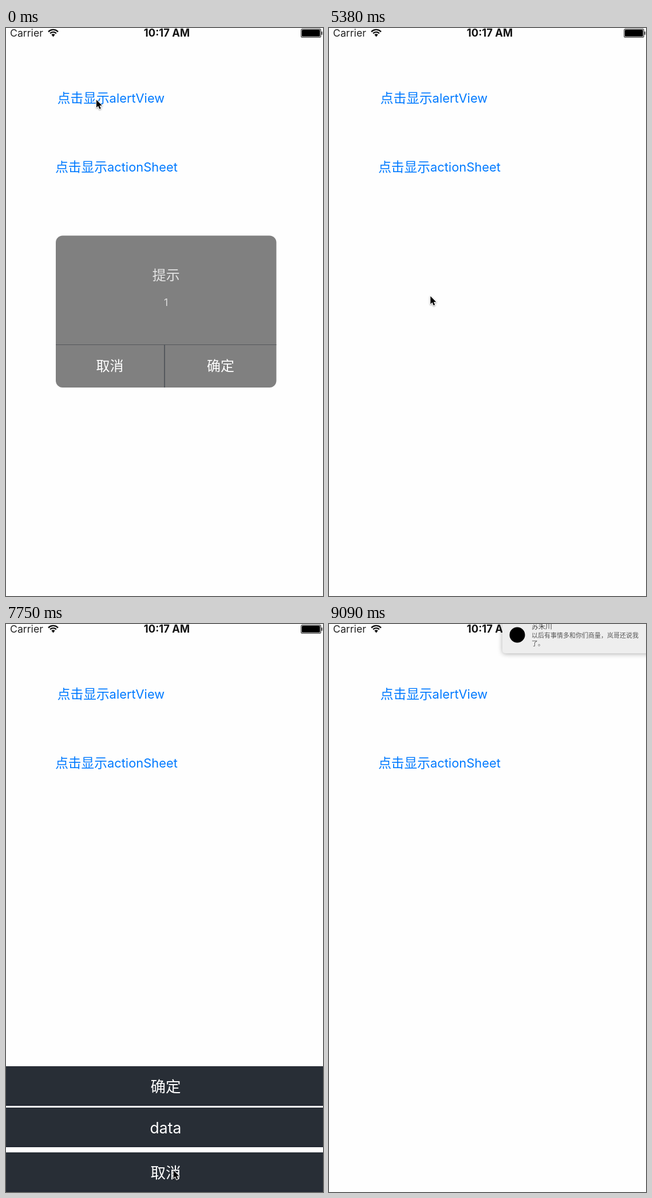
Write an HTML page with a canvas that moves like this. It is 554 px wide and 989 px high and loops after 9.64 s.

```html
<!DOCTYPE html>
<html lang="zh-CN">
<head>
<meta charset="utf-8">
<style>
  html, body { margin: 0; width: 100%; height: 100%; overflow: hidden; background: #fefefe; }
  canvas { display: block; }
</style>
</head>
<body>
<canvas id="stage" width="554" height="989"></canvas>
<script>
const LOOP = 9640, WIDTH = 554, HEIGHT = 989;
const STEP = 148.3;
const DISMISS = 4930;    // the alert starts closing; the refresh clock restarts here
const FONT = 'Inter, "Noto Sans CJK SC", "Noto Sans CJK", sans-serif';
const BLUE = '#007aff';
const ctx = document.getElementById('stage').getContext('2d');

const MOVES = [
  { start: 0, time: 740, x: 202, y: 602 },
  { start: 1330, time: 440, x: 192, y: 594 },
  { start: 5080, time: 720, x: 152, y: 247 },
  { start: 6493, time: 380, x: 276, y: 782 },
  { start: 7010, time: 880, x: 294, y: 964 }
];

const clamp = v => Math.min(1, Math.max(0, v));
const mix = (a, b, u) => a + (b - a) * u;

function ease(t, start, time = 450) {
  const u = clamp((t - start) / time);
  return u * u * (3 - 2 * u);
}

function refreshTime(now) {
  const start = now < DISMISS ? 0 : DISMISS;
  return start + Math.floor((now - start + 5) / STEP) * STEP;
}

function rect(x, y, w, h, color, radius = 0) {
  ctx.fillStyle = color;
  ctx.beginPath();
  ctx.roundRect(x, y, w, h, radius);
  ctx.fill();
}

function text(str, x, y, size, color, align = 'center', weight = 400) {
  ctx.font = `${weight} ${size}px ${FONT}`;
  ctx.textAlign = align;
  ctx.fillStyle = color;
  ctx.fillText(str, x, y);
}

function drawStatusBar() {
  text('Carrier', 7, 15, 17.7, '#222', 'left');
  text('10:17 AM', 281, 15, 18.4, '#111', 'center', 700);

  ctx.strokeStyle = ctx.fillStyle = '#111';
  ctx.lineWidth = 2.4;
  const left = -Math.PI * 0.76, right = -Math.PI * 0.24;
  for (const r of [7.4, 11.6]) {
    ctx.beginPath();
    ctx.arc(82.5, 14.5, r, left, right);
    ctx.stroke();
  }
  ctx.beginPath();
  ctx.moveTo(82.5, 15.5);
  ctx.arc(82.5, 14.5, 4.3, left, right);
  ctx.fill();

  ctx.strokeStyle = '#555';
  ctx.lineWidth = 1.4;
  ctx.beginPath();
  ctx.roundRect(515.7, 1.7, 34.5, 14.5, 2.5);
  ctx.stroke();
  rect(517, 3, 31.7, 11.7, '#000', 1.5);
  rect(551, 6, 2, 6, '#555', 1);
}

function drawLink(name, x, y) {
  text('点击显示', x, y, 22.7, BLUE, 'right');
  text(name, x, y, 21.9, BLUE, 'left');
}

function drawLinks(t) {
  drawLink('alertView', 180.6, 130);
  if (t > 5960) ctx.globalAlpha = mix(0.2, 1, clamp((t - 6185) / 350));
  drawLink('actionSheet', 176.9, 250);
  ctx.globalAlpha = 1;
}

function drawAlert(t) {
  const height = t < DISMISS ? 264.5 : 264.5 * (1 - ease(t, 4750));
  if (height <= 0) return;
  ctx.save();
  ctx.beginPath();
  ctx.roundRect(87, 361.5, 385.5, height, 12);
  ctx.clip();
  rect(87, 361, 386, 266, '#808080');
  text('提示', 279.7, 439, 24, '#e4e4e4');
  text('1', 279.7, 483.5, 17.7, '#dcdcdc');
  rect(87, 551, 386, 1, '#55585c');
  rect(276.2, 551, 1.8, 75, '#505459');
  text('取消', 181.5, 597, 24, '#fff');
  text('确定', 375, 597, 24, '#fff');
  ctx.restore();
}

function drawSheetRow(label, y) {
  rect(0, y, WIDTH, 69, '#282e36');
  rect(0, y + 66, WIDTH, 3, '#252a34');
  text(label, 279, y + 45, 26.6, '#fff');
}

function drawSheet(t) {
  const shown = ease(t, 6151) - ease(t, 8331);
  if (shown <= 0) return;
  const top = Math.round(HEIGHT - 219 * shown);
  rect(0, top, WIDTH, 219, '#fff');
  drawSheetRow('确定', top);
  drawSheetRow('data', top + 72);
  drawSheetRow('取消', top + 150);
}

function drawBanner(t) {
  const shown = ease(t, 8790, 290);
  if (!shown) return;
  ctx.save();
  ctx.translate(260 * (1 - shown), 0);
  ctx.shadowColor = 'rgba(0,0,0,.32)';
  ctx.shadowBlur = 8;
  ctx.shadowOffsetY = 1;
  rect(303, -20, 330, 71, '#eeeeee', 5);
  ctx.shadowColor = 'transparent';
  rect(315.5, 5.5, 27, 27, '#000', 13.5);
  text('苏禾川', 354, 9, 12, '#444', 'left', 500);
  text('以后有事情多和你们商量，岚哥还说我', 354, 24, 11, '#555', 'left');
  text('了。', 354, 38, 11, '#555', 'left');
  ctx.restore();
}

function drawPointer(t) {
  if (t > 8700) return;
  let x = 158, y = 125;
  for (const move of MOVES) {
    const u = ease(t, move.start, move.time);
    x = mix(x, move.x, u);
    y = mix(y, move.y, u);
  }

  ctx.save();
  ctx.translate(x, y);
  const arrow = new Path2D('M0 0V13.6L3.1 10.8L5.4 16L7.8 15L5.5 9.9H9.8Z');
  ctx.lineJoin = 'round';
  ctx.lineWidth = 2;
  ctx.strokeStyle = '#fff';
  ctx.shadowColor = 'rgba(0,0,0,.4)';
  ctx.shadowBlur = 2.5;
  ctx.shadowOffsetY = 1;
  ctx.stroke(arrow);
  ctx.shadowColor = 'transparent';
  ctx.fillStyle = '#000';
  ctx.fill(arrow);
  ctx.restore();
}

function draw() {
  const t = refreshTime(performance.now() % LOOP);
  rect(0, 0, WIDTH, HEIGHT, '#fefefe');
  drawStatusBar();
  drawLinks(t);
  drawAlert(t);
  drawSheet(t);
  drawBanner(t);
  drawPointer(t);
  requestAnimationFrame(draw);
}
draw();
</script>
</body>
</html>
```
